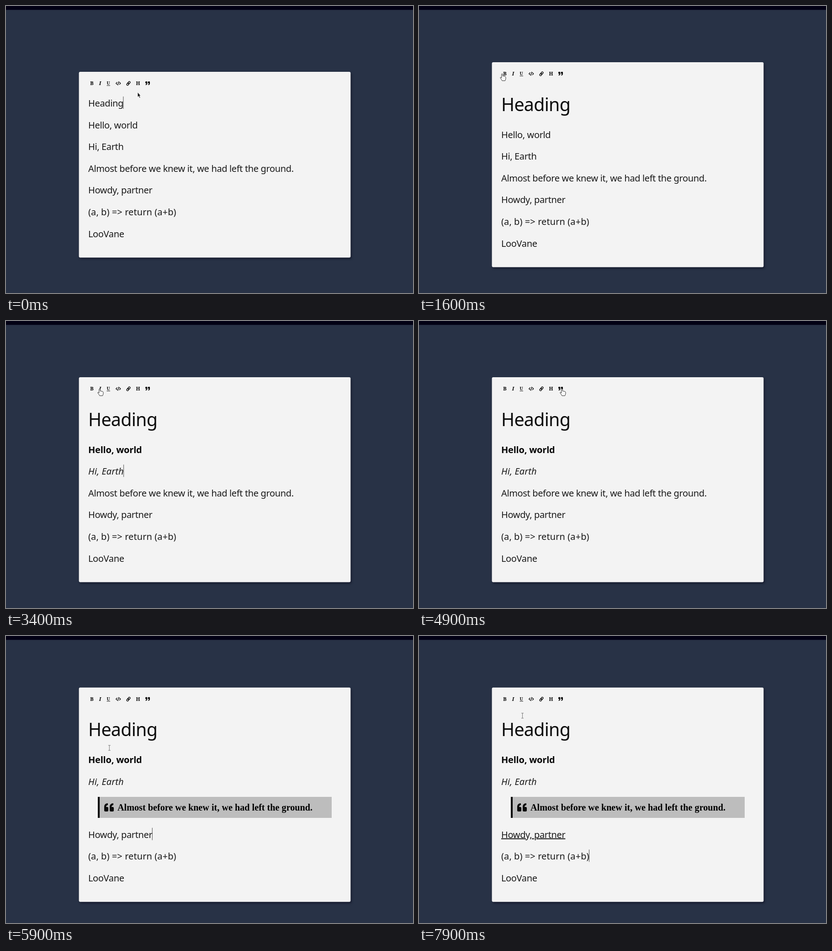
An HTML page that plays this animation: 891x628 px, repeating every 8000 ms.

```html
<!DOCTYPE html>
<html lang="en">
<head>
<meta charset="utf-8">
<title>Rich text editor</title>
<style>
  html, body { margin: 0; width: 100%; height: 100%; overflow: hidden; background: #283246; }
  svg { display: block; }
  #card { fill: #f3f3f3; filter: drop-shadow(2px 3px 2px rgba(8, 10, 28, .6)); }
  #lines text { font: 20px "Noto Sans", sans-serif; letter-spacing: -.018em; fill: #1a1a1a; }
  #lines .heading { font-size: 39.3px; fill: #0c0c0c; }
  #lines .bold { font-weight: 700; letter-spacing: -.01em; fill: #050505; }
  #lines .italic { font-style: italic; letter-spacing: .004em; }
  #lines .underline { text-decoration: underline; text-decoration-thickness: 1px; }
  #lines #code { letter-spacing: .004em; }
  #quote text { font: bold 20.2px "Liberation Serif", serif; }
  #tools text { font: bold 11px "Noto Serif", serif; text-anchor: middle; }
  #tools path, #tools rect { fill: none; stroke: #111; stroke-width: 1.4; }
  #mark { fill: #0a0a0a; stroke: none !important; }
</style>
</head>
<body>
<svg width="891" height="628" viewBox="0 0 891 628">
  <defs>
    <path id="mark" d="M0 13V8C0 3 3 0 8 0V4C6 4 4 6 4 8H6.5Q9 8 9 10.5V15.5Q9 18 6.5 18H2.5Q0 18 0 15.5Z"/>
    <g id="marks"><use href="#mark"/><use href="#mark" x="12"/></g>
  </defs>
  <rect width="891" height="628" fill="#283246"/>
  <rect width="891" height="8.5" fill="#020014"/>
  <rect id="card" x="159.6" width="594.8" rx="3"/>

  <g id="tools">
    <text x="188" y="29">B</text>
    <text x="206" y="29" style="font-style:italic">I</text>
    <text x="224" y="28" style="font-size:9.5px">U</text>
    <path d="M220.5 30H228" style="stroke-width:1"/>
    <path d="M243.5 22.5L240.8 25.2L243.5 28M248 22.5L250.7 25.2L248 28M247 21L244.6 29.5"/>
    <g transform="rotate(-50 268 25.3)">
      <rect x="263" y="23.4" width="6" height="3.8" rx="1.9"/>
      <rect x="267" y="23.4" width="6" height="3.8" rx="1.9"/>
    </g>
    <text x="289" y="29">H</text>
    <use href="#marks" transform="translate(315 29) rotate(180) scale(.47 .45)"/>
  </g>

  <g id="quote">
    <rect x="201" y="352" width="512" height="46" fill="#bdbdbd"/>
    <rect x="201" y="352" width="4" height="46"/>
    <use href="#marks" x="215" y="366"/>
    <text x="244" y="382">Almost before we knew it, we had left the ground.</text>
  </g>

  <g id="lines">
    <text>Heading</text>
    <text>Hello, world</text>
    <text>Hi, Earth</text>
    <text>Almost before we knew it, we had left the ground.</text>
    <text>Howdy, partner</text>
    <text id="code">(a, b) =&gt; return (a+b)</text>
    <text>LooVane</text>
  </g>

  <rect id="caret" width="1.2" fill="#666"/>

  <g id="cursor">
    <path id="arrow" d="M0 0V10L2.2 8L4 12L5.6 11.3L3.9 7.5H6.5Z" fill="#111" stroke="#fff" stroke-width=".5"/>
    <path id="beam" d="M-2.5 -5.5H2.5M-2.5 5.5H2.5M0 -5.5V5.5" fill="none" stroke="#777"/>
    <path id="hand" d="M-1.2 1Q0 -.8 1.2 1V5L6 6Q8 6.5 8 8.5V11Q7.5 13 6.5 15.5H0Q-1 13 -4 9.5Q-4.5 7.5 -2.8 8L-1.2 9.5Z" fill="#fafafa" stroke="#333"/>
  </g>
</svg>
<script>
const LOOP = 8000, STEP = 100, HOLD = 200, BLINK = 500;
const LEFT = 180, LINE = 47.6, MIDDLE = 347.3;

// one edit per line: click beside it at `place`, press the button at `x`, styled at `apply`
const edits = [
  { style: "heading", place: -400, apply: 500, x: 288 },
  { style: "bold", place: 1100, apply: 1800, x: 182 },
  { style: "italic", place: 2300, apply: 3400, x: 205 },
  { style: "quote", place: 4000, apply: 5000, x: 313 },
  { style: "underline", place: 5600, apply: 6300, x: 224 },
  { style: "code", place: 7500, apply: 8200, x: 246 }
];

const $ = id => document.getElementById(id);
const lines = [...document.querySelectorAll("#lines text")];
const set = (el, attrs) => { for (const k in attrs) el.setAttribute(k, attrs[k]); };
const show = (el, on) => el.style.display = on ? "" : "none";
const lineEnd = i => LEFT + lines[i].getComputedTextLength();

// the card stays centred while its content grows
function layout(t) {
  const big = t >= edits[0].apply, quoted = t >= edits[3].apply;
  const height = 406.5 + (big ? 42 : 0) + (quoted ? 20.5 : 0);
  const top = MIDDLE - height / 2;
  const baseline = i => top + 76 + i * LINE
    + (big ? (i ? 42 : 30.5) : 0) + (quoted && i > 3 ? 20.5 : 0);
  return { big, quoted, height, top, baseline };
}

const stops = edits.flatMap(({ place, apply, x }, i) => {
  const { top, baseline } = layout(place), y = top + 25;
  return [
    { t: place, x: lineEnd(i) + 35, y: baseline(i) },
    { t: apply - HOLD, x, y },
    { t: apply, x, y }
  ];
});

// eased moves; long vertical ones swing to the left
function pointer(t) {
  const i = stops.findIndex(s => s.t > t), a = stops[i - 1], b = stops[i];
  const u = (t - a.t) / (b.t - a.t), k = u * u * (3 - 2 * u);
  const swing = (b.y - a.y) ** 2 / 2000 * Math.sin(Math.PI * u);
  return [a.x + (b.x - a.x) * k - swing, a.y + (b.y - a.y) * k];
}

function draw(t) {
  const { big, quoted, height, top, baseline } = layout(t);
  set($("card"), { y: top, height });
  set($("tools"), { transform: `translate(0 ${top})` });
  show($("quote"), quoted);
  show(lines[3], !quoted);
  lines.forEach((line, i) => set(line, {
    x: LEFT, y: baseline(i), class: t >= edits[i]?.apply ? edits[i].style : ""
  }));

  // the caret blinks anew after every click
  const current = edits.findLastIndex(e => t >= e.place);
  const { place, apply } = edits[current];
  const since = t - (t >= apply ? apply : place);
  const tall = big && current === 0;
  show($("caret"), since % (2 * BLINK) < BLINK && !(quoted && current === 3));
  set($("caret"), {
    x: lineEnd(current) - .7,
    y: baseline(current) - (tall ? 46 : 22),
    height: tall ? 54 : 27
  });

  const [x, y] = pointer(t), depth = y - top;
  const onTools = depth > 15 && depth < 36 && x > 180 && x < 318;
  const kind = onTools ? "hand" : depth > 52 ? "beam" : "arrow";
  for (const id of ["arrow", "beam", "hand"]) show($(id), id === kind);
  set($("cursor"), { transform: `translate(${x} ${y})` });
}

const start = performance.now();
function tick() {
  const t = (performance.now() - start) % LOOP;
  draw(Math.floor(t / STEP) * STEP);
  requestAnimationFrame(tick);
}
tick();
</script>
</body>
</html>
```
